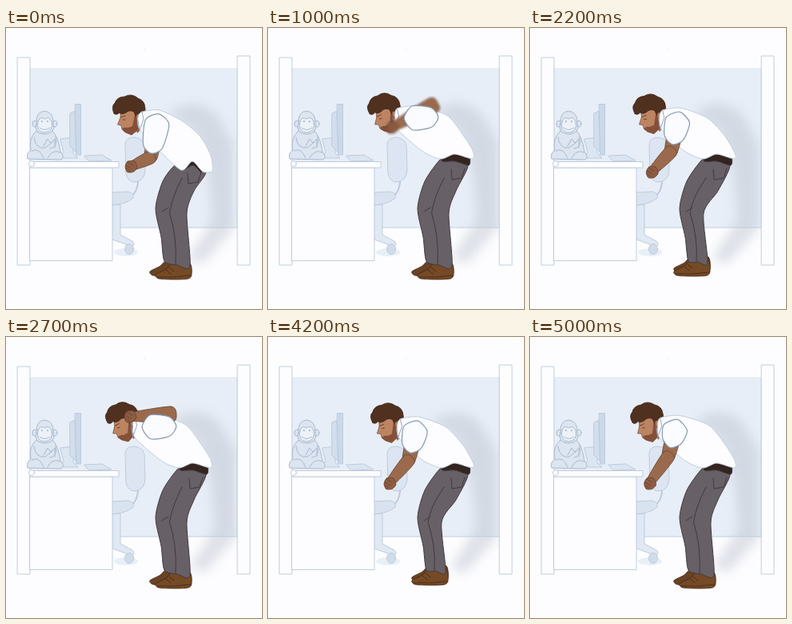
An HTML page that plays this animation: 320x352 px, repeating every 5100 ms.

```html
<!DOCTYPE html>
<html lang="en">
<head>
<meta charset="utf-8">
<title>Office stretch</title>
<style>
  html, body { margin: 0; width: 100%; height: 100%; overflow: hidden; background: #fdfdff; }
  svg { display: block; width: 320px; height: 352px; }
  path, ellipse { stroke-linejoin: round; stroke-linecap: round; }
</style>
</head>
<body>
<svg viewBox="0 0 320 352">
  <defs>
    <clipPath id="cubicle"><path d="M30 51H289V352H30Z"/></clipPath>
  </defs>
  <rect width="320" height="352" fill="#fdfdff"/>
  <circle cx="173" cy="27" r=".7" fill="#dde"/>

  <g stroke="#b9c8dc" stroke-width=".9" fill="#fdfdff">
    <path d="M30 51H289V250H30Z" fill="#e8eef7" stroke="#dae4f0"/>
    <path d="M133 250H289" stroke="#c6d3e3"/>
    <path d="M14.500 37H30V297H14.500ZM289.500 35H305V297H289.500Z"/>
    <!-- chair -->
    <ellipse cx="150" cy="281" rx="15" ry="5" fill="#e9eff7" stroke="none"/>
    <path d="M149 145Q150 137 160 137Q171 138 173 147L174 178Q173 192 161 193Q152 193 150 182Z" fill="#dce5f1"/>
    <path d="M165 193Q164 206 156 211" fill="none" stroke-width="2"/>
    <path d="M132 206L153 205Q161 207 159 213Q150 221 132 222Z" fill="#d9e3f0"/>
    <path d="M133 222L143 221V259L158 267Q162 270 158 274L133 265Z" fill="#e0e8f3"/>
    <ellipse cx="154" cy="277" rx="5.500" ry="6.500" fill="#d0dcea"/>
    <!-- desk -->
    <path d="M30 175H133V291.500H30Z"/>
    <path d="M30 167.500H141V175H30Z"/>
    <ellipse cx="32" cy="170" rx="3.500" ry="3.500"/>
    <!-- computer -->
    <path d="M68 139L84 137V157L90 163H66L72 156Z" fill="#dce6f2"/>
    <path d="M80 107L86 104L88 156L80 148Z" fill="#d2deec"/>
    <path d="M86.500 95.500H93.500V159H88Z" fill="#cbd8e8"/>
    <path d="M98 160L120 159L132 166L104 167Z" fill="#dbe5f1"/>
  </g>

  <!-- monkey -->
  <g stroke="#a9bacf" fill="#dce5f0">
    <path d="M37 130Q28 139 31 153Q25 157 27 164L69 165Q74 161 68 155Q65 135 58 129Z"/>
    <ellipse cx="36" cy="120" rx="3" ry="4"/><ellipse cx="61" cy="120" rx="3" ry="4"/>
    <path d="M38 120Q37 105 48 104Q60 105 59 120Q63 132 48 133Q34 132 38 120Z"/>
    <path d="M40 117Q43 110 48 114Q54 110 57 117Q60 130 48 131Q37 130 40 117Z" fill="#edf2f9"/>
    <path d="M42 125Q48 130 55 125M35 137Q37 152 49 150L58 143M62 136Q65 150 55 151M32 154Q42 149 47 163M68 156Q58 151 52 163M47 148L52 139L56 144L61 139V150" fill="none"/>
    <circle cx="45" cy="117" r=".8"/><circle cx="52" cy="117" r=".8"/>
  </g>

  <g clip-path="url(#cubicle)">
    <path id="shadow" d="M203 106Q236 84 263 108L284 145V252L245 296L226 290L258 240L252 180L236 130Z" fill="#bfc5d1" opacity=".5" style="filter:blur(7px)"/>
  </g>

  <g stroke="#40251a" stroke-width=".8">
    <path id="farShoe" fill="#6a4324"/>
    <path id="nearShoe" fill="#754a25"/>
    <path id="laces" fill="none"/>
  </g>
  <g stroke="#403b41">
    <path id="legs" fill="#676066"/>
    <path id="seams" fill="none"/>
    <path id="belt" fill="#33241f"/>
  </g>
  <g id="head" stroke-width=".7">
    <path d="M156 105L174 101L178 118L164 132Z" fill="#98664a"/>
    <path d="M143 103L164 101L169 113L165 127L157 134L150 131L145 127L144 122L139.500 121L143 112Z" fill="#bd8462" stroke="#754a35"/>
    <path d="M161 109L167 110L165 128L157 134L149 131L145 127L152 125L158 123Z" fill="#855039"/>
    <path d="M143 112L149 110M146 115H149M146 126L151 125" stroke="#4b2a20" fill="none"/>
    <path d="M135 107Q131 98 136 94Q139 86 148 86Q157 81 165 88Q174 91 174 101Q174 107 168 108L163 113L160 105Q154 102 150 106Q144 109 142 106Q138 110 135 107Z" fill="#50301f" stroke="#3a2118"/>
    <ellipse cx="165" cy="112" rx="2.500" ry="4" fill="#b47a5a" stroke="#704630"/>
  </g>
  <path id="torso" fill="#fdfdff" stroke="#c0cee0"/>
  <path id="collar" fill="none" stroke="#93a6c1"/>
  <g id="arm" fill="#9b6a4c" stroke="#644331" stroke-width=".8">
    <path id="upper"/>
    <path id="fore"/>
    <path id="hand" fill="#8f5c42"/>
    <path id="fingers" fill="none"/>
  </g>
  <path id="sleeve" fill="#fbfcff" stroke="#8499b7" stroke-width="1.200"/>
</svg>

<script>
const LOOP = 5100, ARM_CYCLES = 9, STEPS_TAKEN = 4, TICK = 100;
const PEAK = .765, RAISE = .45, DROP = .823;
const $ = id => document.getElementById(id);
const draw = (id, d) => $(id).setAttribute('d', d);
const clamp = v => Math.max(0, Math.min(1, v));
const ease = v => (1 - Math.cos(Math.PI * clamp(v))) / 2;
const mix = (a, b, k) => a.map((v, i) => v + (b[i] - v) * k);

// closed smooth curve through points
function smooth(points) {
  const n = points.length, at = i => points[(i + n) % n];
  const curves = points.map((b, i) => {
    const a = at(i - 1), c = at(i + 1), e = at(i + 2);
    return `C${b.map((v, j) => v + (c[j] - a[j]) / 8)} ${c.map((v, j) => v - (e[j] - b[j]) / 8)} ${c}`;
  });
  return `M${at(0)}${curves.join('')}Z`;
}

// tapered limb with rounded ends
function limb(a, b, wa, wb) {
  const angle = Math.atan2(b[1] - a[1], b[0] - a[0]);
  const cap = ([x, y], w, from) => [0, 1, 2].map(i => {
    const turn = angle + from + i * Math.PI / 2, r = i === 1 ? w * .7 : w;
    return [x + r * Math.cos(turn), y + r * Math.sin(turn)];
  });
  return smooth([...cap(a, wa, Math.PI / 2), ...cap(b, wb, -Math.PI / 2)]);
}

function drawLegs(lift, stance) {
  const knee = 187, ankle = 198, calf = 217 + 9 * stance, heel = 222 + 8 * stance;
  const right = 225 + 7 * stance, floor = 311 + 4 * stance, hem = (ankle + heel) / 2;

  draw('legs', smooth([
    [212 + 4 * lift, 171 - 7 * lift], [knee + 9, 192], [knee, 226], [knee + 7, 262], [ankle, 292],
    [hem, floor - 18], [heel, floor - 17], [calf, 232], [235, 204], [250, 180 - 8 * lift], [232, 165 - 5 * lift]
  ]));
  const seam = (knee + calf) / 2;
  draw('seams', `M220 188Q${seam + 1} 212 ${seam - 2} 232Q${hem} 262 ${hem - 2} ${floor - 19}` +
    `M${227 + 2 * lift} ${182 - 5 * lift}l1 13l12 -2l4 -12M${knee + 8} 230l8 -5`);

  const shoe = (x, y) => smooth([
    [x - 2, y - 20], [x, y - 6], [x - 4, y - 1], [x - 20, y], [x - 41, y - 1],
    [x - 45, y - 6], [x - 32, y - 13], [x - 23, y - 21]
  ]);
  draw('farShoe', shoe(225, floor - 4));
  draw('nearShoe', shoe(right, floor));
  draw('laces', `M${right - 32} ${floor - 12}l6 5m-2 -8l6 5M${right - 43} ${floor - 3}h22l20 -2`);
}

function drawBody(lean, lift) {
  $('shadow').setAttribute('transform', `translate(${3 * lean} ${-lean})`);
  $('head').setAttribute('transform', `translate(${-7 * lean} ${-3 * lean}) rotate(${-8 * lean} 160 112)`);
  draw('torso', smooth([
    [170 - 8 * lean, 105 - 4 * lean], [192 - 5 * lean, 103 - 5 * lean], [221 + 3 * lean, 117 - 7 * lean],
    [243 + 2 * lean, 136], [256, 160 - 6 * lean], [258 - lift, 179 - 16 * lift],
    [246 + 5 * lift, 180 - 17 * lift], [233, 167 - 9 * lift], [219 - 3 * lift, 178 - 14 * lift],
    [190 + 4 * lean, 152 + 3 * lean], [167 - 5 * lean, 127], [165 - 6 * lean, 112]
  ]));
  draw('belt', smooth([
    [220 - 2 * lift, 170 - 12 * lift], [233, 166 - 9 * lift], [243 + 8 * lift, 173 - 12 * lift],
    [244 + 7 * lift, 181 - 9 * lift], [234, 172 - 5 * lift], [220 - 2 * lift, 178 - 11 * lift]
  ]));
  draw('collar', `M${170 - 8 * lean} ${105 - 3 * lean}l2 9l-5 14l-2 -12`);
}

function drawArm(lean, raised, settle, swing) {
  const shoulder = [189 - 8 * lean, 118 - 5 * lean];
  const elbow = mix([181 - 9 * lean, 162 - 14 * lean], [206, 97], raised);
  const hand = mix([155 - 7 * lean, 174 + 10 * settle], [154, 100 + 25 * swing], raised);
  const cuff = mix(shoulder, elbow, .7 - .25 * lean + .5 * raised);
  cuff[1] += 14 * raised;
  const [x, y] = hand;

  draw('upper', limb(shoulder, elbow, 9, 8));
  draw('fore', limb(elbow, hand, 8 + 2 * raised, 5));
  draw('hand', limb([x + 3, y - 3], [x - 1, y + 3], 7, 6));
  draw('fingers', `M${x - 5} ${y - 2}l7 4m-5 -8l7 4m-9 4l5 3`);
  $('arm').style.filter = swing ? `blur(${1.5 * swing}px)` : 'none';
  draw('sleeve', limb(shoulder, cuff, 15, 12));
}

function render(t) {
  const cycle = t * ARM_CYCLES / LOOP, p = cycle % 1;
  const lean = 1.05 * (p < PEAK ? p / PEAK : ease((1 - p) / (1 - PEAK)));
  const raised = ease(Math.min((p - RAISE) / .25, (DROP - p) / .055));
  const settle = clamp(6 * Math.min(p, 1 - p));
  const swing = Math.floor(cycle) % 2 * raised;
  const shift = Math.cos(2 * Math.PI * (t * STEPS_TAKEN / LOOP + .03));
  const lift = ease(2 * lean);

  drawLegs(lift, clamp(5 * shift - .85));
  drawBody(lean, lift);
  drawArm(lean, raised, settle, swing);
}

const start = performance.now();
function tick() {
  const t = (performance.now() - start) % LOOP;
  render(Math.floor(t / TICK) * TICK);
  requestAnimationFrame(tick);
}
tick();
</script>
</body>
</html>
```
